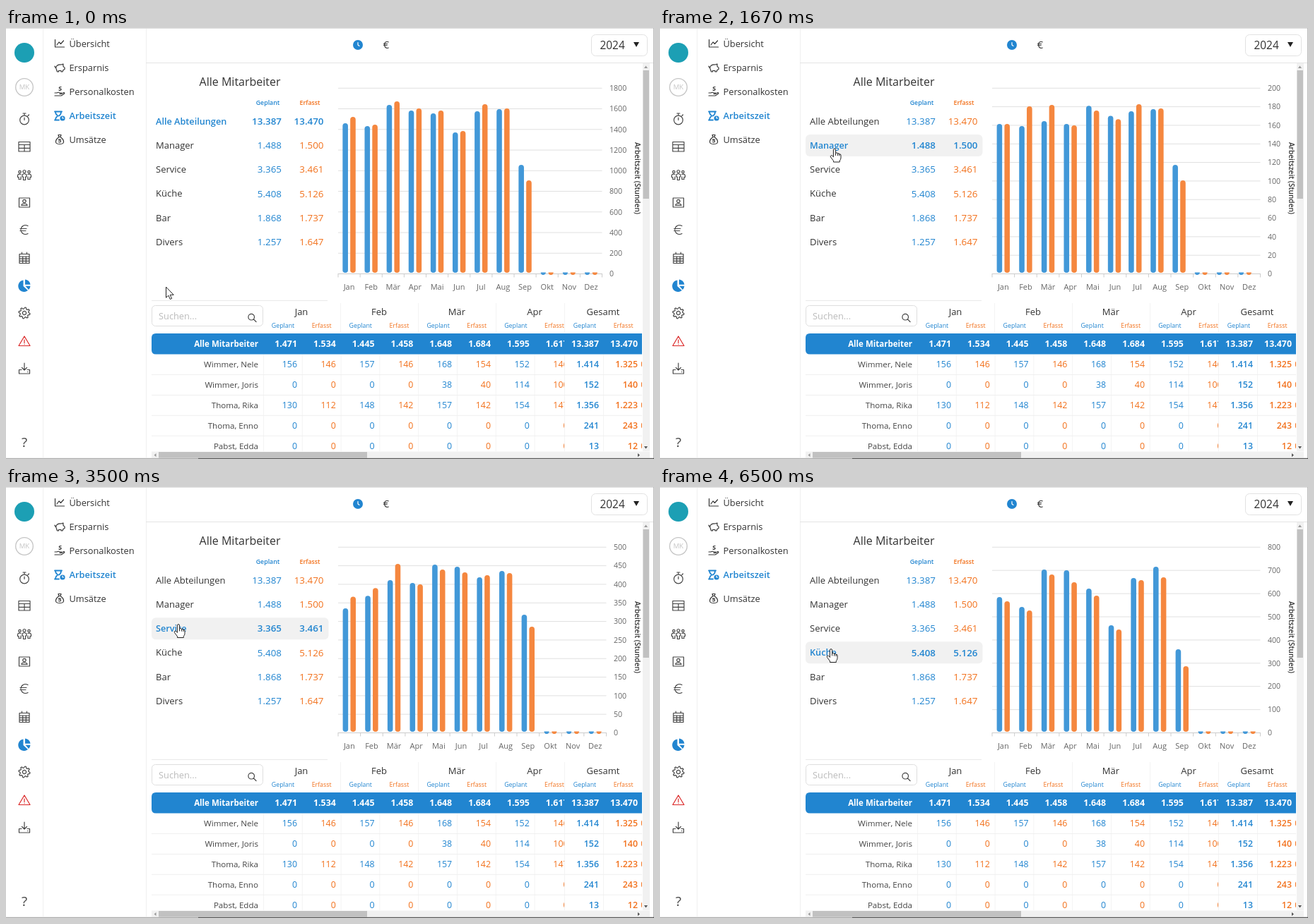
Recreate the animation shown at these times as an HTML page. Size 917 px wide and 611 px high, loop 6730 ms.

```html
<!DOCTYPE html>
<html lang="de">
<head>
<meta charset="utf-8">
<title>Arbeitszeit</title>
<style>
html, body { margin: 0; width: 100%; height: 100%; overflow: hidden; background: #fff; }
svg { display: block; width: 917px; height: 611px; font-family: "Open Sans", "Noto Sans", sans-serif; }
</style>
</head>
<body>
<svg id="stage" viewBox="0 0 917 611"></svg>
<script>
const LOOP = 6730;
const BLUE = '#2185d0', ORANGE = '#f2711c', INK = '#333', GRAY = '#666', FAINT = '#efefef';
const MONTHS = ['Jan', 'Feb', 'Mär', 'Apr', 'Mai', 'Jun', 'Jul', 'Aug', 'Sep', 'Okt', 'Nov', 'Dez'];
const BASE = 347, LEFT = 470, BAR_DELAY = 70, BAR_TIME = 180;

// tops: y of the planned and recorded bar of each month
const VIEWS = [
  { at: 0, bars: -5000, row: 0, right: 843.5, max: 1800, step: 200,
    tops: [135, 126, 139, 137, 109, 104, 117, 114, 121, 117, 148, 146, 118, 108, 115, 114, 194, 216] },
  { at: 1230, bars: 1265, row: 1, right: 849.5, max: 200, step: 20,
    tops: [136, 136, 139, 111, 132, 109, 136, 138, 110, 117, 113, 121, 128, 125, 119, 122, 181, 198] },
  { at: 3370, bars: 3373, row: 2, right: 849.5, max: 500, step: 50,
    tops: [173, 156, 161, 158, 166, 144, 165, 156, 134, 123, 168, 165, 130, 117, 99, 97, 184, 216] },
  { at: 5470, bars: 5475, row: 3, right: 849.5, max: 800, step: 100,
    tops: [156, 162, 170, 175, 117, 124, 118, 135, 144, 154, 196, 202, 129, 132, 113, 128, 230, 254] }
];
const MOVES = [
  { from: 130, to: 830, a: [226, 367], b: [247, 171] },
  { from: 2470, to: 2800, a: [247, 171], b: [244, 194.5] },
  { from: 4570, to: 4930, a: [244, 194.5], b: [242, 229.5] }
];
const DEPARTMENTS = [
  ['Alle Abteilungen', '13.387', '13.470'], ['Manager', '1.488', '1.500'], ['Service', '3.365', '3.461'],
  ['Küche', '5.408', '5.126'], ['Bar', '1.868', '1.737'], ['Divers', '1.257', '1.647']
];
const STAFF = [
  ['Wimmer, Nele', '156 146 157 146 168 154 152 146 1.414 1.325'],
  ['Wimmer, Joris', '0 0 0 0 38 40 114 100 152 140'],
  ['Thoma, Rika', '130 112 148 142 157 142 154 147 1.356 1.223'],
  ['Thoma, Enno', '0 0 0 0 0 0 0 0 241 243'],
  ['Pabst, Edda', '0 0 0 0 0 0 0 0 13 12']
];

const rowY = i => 132.5 + 34.1 * i;
// y is the middle of the capital letters
const text = (x, y, s, size, fill = INK, anchor = 'start', weight = 400) =>
  `<text x="${x}" y="${(y + size * .357).toFixed(2)}" font-size="${size}" fill="${fill}" text-anchor="${anchor}" font-weight="${weight}">${s}</text>`;
const line = (x1, y1, x2, y2, color = FAINT, w = 1) =>
  `<path d="M${x1} ${y1}L${x2} ${y2}" stroke="${color}" stroke-width="${w}"/>`;
const box = (x, y, w, h, fill, r = 0, stroke = 'none') =>
  `<rect x="${x}" y="${y}" width="${w}" height="${h}" rx="${r}" fill="${fill}" stroke="${stroke}"/>`;
const icon = (x, y, d, color = '#444', extra = '') =>
  `<path transform="translate(${x} ${y})" d="${d}" fill="none" stroke="${color}" stroke-width="1.2" stroke-linecap="round" stroke-linejoin="round" ${extra}/>`;
const ring = (x, y, r) => `M${x - r} ${y}a${r} ${r} 0 1 0 ${2 * r} 0a${r} ${r} 0 1 0 ${-2 * r} 0`;
const solid = (d, fill) => `<path d="${d}" fill="${fill}"/>`;

function gearPath() {
  let d = '';
  for (let i = 0; i < 32; i++) {
    const r = i % 4 < 2 ? 8 : 6, a = (i + .5) * Math.PI / 16;
    d += (i ? 'L' : 'M') + (r * Math.cos(a)).toFixed(1) + ' ' + (r * Math.sin(a)).toFixed(1);
  }
  return d + 'Z' + ring(0, 0, 2.6);
}

function sidebar() {
  return line(52.5, 0, 52.5, 609) + line(198.5, 0, 198.5, 609) +
    '<circle cx="26" cy="35" r="14" fill="#1c9fb4"/>' +
    '<circle cx="26" cy="84" r="12.3" fill="none" stroke="#c4c4c4" stroke-width="1.3"/>' +
    text(26, 84, 'MK', 9.5, '#c4c4c4', 'middle') +
    icon(26, 129, ring(0, 1.5, 6.3) + 'M0 1.5V-2M-2-8H2M0-8V-5M5-4.5L6.5-6') +
    icon(26, 168, 'M-8-6.5H8V7H-8ZM-8-2.5H8M-8 2.3H8M0-2.5V7') +
    icon(26, 208, ring(0, -4.5, 2) + ring(-6.5, -4, 1.7) + ring(6.5, -4, 1.7) +
      'M-3 0Q0-2.5 3 0V3H1.5V7.5H-1.5V3H-3ZM-5-.5Q-9-1.5-9.5 1V3.5H-8V6.5H-5V3M5-.5Q9-1.5 9.5 1V3.5H8V6.5H5V3') +
    icon(26, 247, 'M-7.5-6H7.5V7H-7.5Z' + ring(0, -1.5, 2.2) + 'M-4 4.5Q-4 2 0 2Q4 2 4 4.5Z') +
    icon(26, 286, 'M5-5.5A6.5 6.5 0 1 0 5 5.5M-6-1.5H3M-6 1.5H2', '#444') +
    icon(26, 326, 'M-7-5.5H7V7.5H-7ZM-7-2H7M-7 1.2H7M-7 4.4H7M-2.3-2V7.5M2.3-2V7.5M-3.5-8V-5.5M3.5-8V-5.5') +
    solid('M24.5 357.5V366L31 372A8.3 8.3 0 1 1 24.5 357.5Z', BLUE) +
    solid('M27 356.5A8 8 0 0 1 34.5 363.8H27Z', BLUE) +
    solid('M27.5 365.8H34.5A8 8 0 0 1 32 371Z', BLUE) +
    icon(26, 404, gearPath()) +
    icon(26, 444, 'M0-7L8 6.5H-8ZM0-2V2.5M0 4.4V4.6', '#db2828') +
    icon(26, 483, 'M0-8V2M-3.5-1.5L0 2L3.5-1.5M-4 1.5H-7.5V7H7.5V1.5H4M4.5 4.5H5') +
    text(26, 587, '?', 19, '#444', 'middle') +
    icon(76, 22, 'M-6.5-5.5V5H6.5M-4 2L-1-2L1.5 .5L5.5-4', '#333') +
    icon(76, 56, 'M-5-1Q-3-4.5 2-4L5-5L4.8-2.2Q6 0 7 0V2.5L5 3.5L4 6H2V4.5H-1.5V6H-3.5L-4.5 3Q-6 1-5-1ZM-7-2Q-7 0-5 0', '#333') +
    icon(76, 90, 'M-7 2H-4Q-2 .5 0 2H2.5Q3.5 3.5 0 3.5M2.5 3.2L6 1.5Q7.5 2 6 3.5L2 6H-7M2-6.5Q-1.5-6.5-.5-4.5Q2.5-4 2-2.5Q.5-1-1-2', '#333') +
    icon(76, 124.5, 'M-7-6H3M-6-6Q-6-2-2.5 0Q-6 2-6 6M2-6Q2-2-1 0M-7 6H-1', BLUE, 'style="stroke-width:1.8"') +
    `<circle cx="80" cy="128" r="3.6" fill="${BLUE}"/>` + icon(80, 128, 'M0-1.8V0H1.5', '#fff') +
    icon(76, 158, 'M-2-6.5H2L1-3.5Q6 0 5.5 4Q5 6.5 0 6.5Q-5 6.5-5.5 4Q-6 0-1-3.5ZM-1-3.5H1M1.7 .3Q-1.5-.8-1.5 1Q1.8 1.6 1.5 3Q.5 4.5-1.6 3.5', '#333') +
    ['Übersicht', 'Ersparnis', 'Personalkosten', 'Arbeitszeit', 'Umsätze'].map((s, i) =>
      text(89.5, 22 + 34.1 * i, s, 12.8, i === 3 ? BLUE : INK, 'start', i === 3 ? 600 : 400)).join('');
}

function header() {
  return line(198, 49.5, 917, 49.5, '#e4e4e4') +
    `<circle cx="498" cy="24" r="7" fill="${BLUE}"/>` + icon(498, 24, 'M0-3.5V0L2 1.5', '#fff') +
    text(538, 24, '€', 15, INK, 'middle') +
    box(828.5, 9.5, 79, 30, '#fff', 6, '#e2e2e2') + text(840.5, 24.5, '2024', 15.4) +
    solid('M888 20H896L892 27Z', '#222');
}

function departments() {
  return '<rect id="hover" x="206" width="250.5" height="31" rx="6" fill="#f1f1f1"/>' +
    text(331, 76.5, 'Alle Mitarbeiter', 16, INK, 'middle') +
    text(370.5, 106, 'Geplant', 8.8, BLUE, 'middle', 600) + text(430, 106, 'Erfasst', 8.8, ORANGE, 'middle', 600) +
    DEPARTMENTS.map(([name, plan, real], i) => '<g class="dep">' + text(212, rowY(i), name, 13) +
      text(390, rowY(i), plan, 13.4, BLUE, 'end') + text(449.5, rowY(i), real, 13.4, ORANGE, 'end') + '</g>').join('');
}

function axes(view) {
  const n = view.max / view.step, band = (view.right - LEFT) / 12;
  let s = '<g class="axes">';
  for (let i = 0; i <= n; i++) {
    const y = 348.5 - 263.2 * i / n;
    s += line(LEFT, y, view.right, y, i ? '#e0e0e0' : '#ccc') + text(view.right + 10.5, y, i * view.step, 10.6, GRAY);
  }
  for (let i = 0; i <= 12; i++) s += line(LEFT + band * i, 348, LEFT + band * i, 353.5, '#ccc');
  MONTHS.forEach((m, i) => s += text(LEFT + band * (i + .5), 367.5, m, 11, GRAY, 'middle'));
  return s + '</g>';
}

function chart() {
  let bars = '';
  for (let i = 0; i < 24; i++) {
    const fill = i % 2 ? '#f5873f' : '#4298d8';
    bars += i < 18 ? `<rect class="bar" width="7.6" rx="3.8" fill="${fill}"/>`
      : `<path class="bar" d="M0 346.5H7.6Q6.6 350 4.6 350H3Q1 350 0 346.5Z" fill="${fill}"/>`;
  }
  return VIEWS.map(axes).join('') + bars +
    '<g transform="translate(893.5 213) rotate(90)">' + text(0, 0, 'Arbeitszeit (Stunden)', 10.1, INK, 'middle', 600) + '</g>';
}

const colRight = i => i < 8 ? 412 + 54.8 * i : 839 + 55 * (i - 8);
const cells = (values, y, weight, fill) => {
  const cell = i => text(colRight(i), y, values[i], 12.4, fill || (i % 2 ? ORANGE : BLUE), 'end', i > 7 && !fill ? 600 : weight);
  const all = values.map((_, i) => cell(i));
  return '<g clip-path="url(#months)">' + all.slice(0, 8).join('') + '</g>' + all.slice(8).join('');
};

function table() {
  let s = line(206, 386.5, 455, 386.5, '#e9e9e9') + box(206.5, 393.5, 157, 29, '#fff', 5, '#dedede') +
    text(216, 408.5, 'Suchen...', 12.8, '#bbb') + icon(348, 410.5, ring(-.8, -.8, 4.3) + 'M2.4 2.4L6 6');
  ['Jan', 'Feb', 'Mär', 'Apr', 'Gesamt'].forEach((m, i) => {
    const x = i < 4 ? 418 + 110 * i : 845;
    const plan = i < 4 ? 392 + 109.8 * i : 819;
    s += text(x, 402, m, 13, INK, 'middle') + text(plan, 421.5, 'Geplant', 8.8, BLUE, 'middle') +
      `<g ${i === 3 ? 'clip-path="url(#months)"' : ''}>` + text(plan + 54.6, 421.5, 'Erfasst', 8.8, ORANGE, 'middle') + '</g>';
    if (i < 4) s += line(i < 3 ? 473.5 + 110 * i : 790.5, 390, i < 3 ? 473.5 + 110 * i : 790.5, 432, '#f3f3f3');
  });
  for (let i = 0; i < 10; i++) {
    const x = i < 8 ? 364.5 + 54.8 * i : 790.5 + 55 * (i - 8);
    s += line(x, 463, x, 600, '#f4f4f4');
  }
  s += solid('M212 433H900V462.5H212Q206 462.5 206 456.5V439Q206 433 212 433Z', BLUE) +
    text(357, 447.5, 'Alle Mitarbeiter', 11.5, '#fff', 'end', 700) +
    cells('1.471 1.534 1.445 1.458 1.648 1.684 1.595 1.617 13.387 13.470'.split(' '), 447.5, 700, '#fff');
  STAFF.forEach(([name, values], i) => {
    const y = 477 + 28.9 * i;
    s += line(206, y + 14.5, 900, y + 14.5) + text(357, y, name, 11.6, '#444', 'end') +
      cells(values.split(' '), y, 400) + text(898.3, y, '0', 12.4, ORANGE);
  });
  return `<g clip-path="url(#table)">${s}</g>`;
}

function frame() {
  return box(901, 50, 10, 550, '#f1f1f1') + box(901.5, 60, 8.5, 182, '#c1c1c1') +
    solid('M903 57H908L905.5 53.5Z', '#999') + solid('M903 593H908L905.5 596.5Z', '#555') +
    box(206, 600.5, 705, 9, '#f1f1f1') + box(216, 601, 295, 8.5, '#c1c1c1') +
    solid('M212.5 603V608L209.5 605.5Z', '#999') + solid('M894 603V608L897 605.5Z', '#555') +
    line(0, .5, 917, .5, '#ddd') + line(916.5, 0, 916.5, 611, '#bbb') +
    line(0, 610.3, 272, 610.3, '#999') + line(272, 610.3, 917, 610.3, '#333');
}

const pointer = '<g id="cursor" fill="#fff" stroke="#222" stroke-linejoin="round" stroke-linecap="round">' +
  '<path id="arrow" d="M.5 .5V15.2L3.9 12.2L6.3 17.5L8.6 16.5L6.2 11.3H10.8Z"/>' +
  '<path id="hand" d="M-1.6 11V1.6Q-1.5 .2 0 .2Q1.5 .2 1.6 1.6V6.2Q4.2 5.2 4.6 7Q6.8 6.3 7 8Q9 7.4 9 9.4V13Q9 15.5 7.3 17V19H-1.5V17.3L-5.5 12Q-6.3 10.3-4.8 9.6Q-3.6 9.3-1.6 11.6ZM1.6 6.5V9.5M4.6 7.2V9.8M7 8.2V10"/></g>';

const stage = document.getElementById('stage');
stage.innerHTML = '<defs><clipPath id="months"><path d="M200 380H790V601H200Z"/></clipPath>' +
  '<clipPath id="table"><path d="M200 380H900V600.5H200Z"/></clipPath></defs>' +
  sidebar() + header() + departments() + chart() + table() + frame() + pointer;

const all = s => [...stage.querySelectorAll(s)], one = s => stage.querySelector(s);
const bars = all('.bar'), axisSets = all('.axes'), deps = all('.dep');
const hover = one('#hover'), cursor = one('#cursor'), arrow = one('#arrow'), hand = one('#hand');
const clamp = v => Math.min(1, Math.max(0, v));
const mix = (a, b, p) => a + (b - a) * p;
const show = (el, on) => el.setAttribute('visibility', on ? 'visible' : 'hidden');
const barX = (view, i) => LEFT + (view.right - LEFT) / 12 * ((i >> 1) + .5) + (i % 2 ? 5.4 : -5.4) - 3.8;

function drawChart(t) {
  const k = VIEWS.findLastIndex(v => t >= v.at);
  const now = VIEWS[k], before = VIEWS[Math.max(0, k - 1)];
  axisSets.forEach((g, i) => show(g, i === k));
  bars.forEach((bar, i) => {
    const p = clamp((t - now.bars - (i >> 1) * BAR_DELAY) / BAR_TIME);
    const eased = 1 - (1 - p) ** 3;
    const x = mix(barX(before, i), barX(now, i), eased);
    if (i >= 18) return bar.setAttribute('transform', `translate(${x} 0)`);
    const y = mix(before.tops[i], now.tops[i], eased);
    bar.setAttribute('x', x);
    bar.setAttribute('y', y);
    bar.setAttribute('height', BASE - y);
  });
  deps.forEach((g, i) => {
    const on = i === now.row, [name, , real] = g.children;
    g.setAttribute('font-weight', on ? 600 : 400);
    for (const el of g.children) el.setAttribute('font-weight', on ? 600 : 400);
    name.setAttribute('fill', on ? BLUE : INK);
    name.setAttribute('font-size', on ? 12.7 : 13);
    real.setAttribute('fill', on ? BLUE : ORANGE);
  });
}

function drawCursor(t) {
  const move = MOVES.findLast(m => t >= m.from) || MOVES[0];
  const p = clamp((t - move.from) / (move.to - move.from)), eased = p * p * (3 - 2 * p);
  const [x, y] = [0, 1].map(i => mix(move.a[i], move.b[i], eased));
  const row = Math.round((y - rowY(0)) / 34.1), over = row < DEPARTMENTS.length;
  cursor.setAttribute('transform', `translate(${x} ${y})`);
  show(arrow, !over);
  show(hand, over);
  show(hover, over);
  hover.setAttribute('y', rowY(row) - 15.5);
}

function tick(now) {
  const t = now % LOOP;
  drawChart(t);
  drawCursor(t);
  requestAnimationFrame(tick);
}
tick(0);
</script>
</body>
</html>
```
